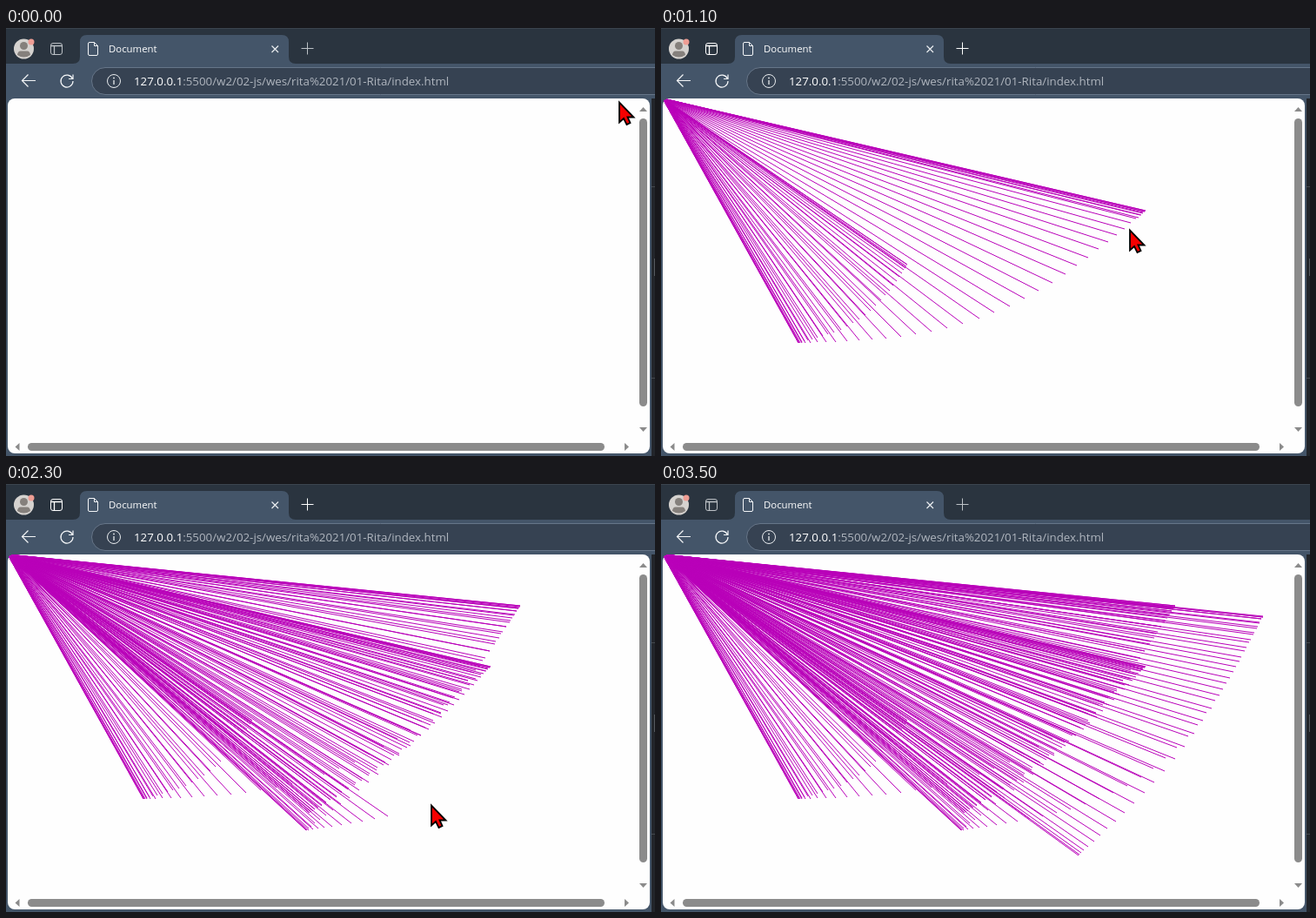
These frames come from a looping animation (746x492 px, 3.6 s). An HTML page with a canvas:

```html
<!DOCTYPE html>
<html lang="en">
<head>
<meta charset="utf-8">
<title>Mouse lines</title>
<style>
html, body { margin: 0; width: 746px; height: 492px; overflow: hidden; background: #445569; }
canvas { display: block; }
</style>
</head>
<body>
<canvas id="stage" width="746" height="492"></canvas>
<script>
const g = document.getElementById('stage').getContext('2d');
const LOOP = 3600, FRAME = 100, EVENT = 10, LAG = 28;
const PRESS = 380, RELEASE = 2830, LEAVE = 3200, BLUR = 3500;

// Turning points of the pointer; bulge bends the swing that leads there
const turns = [
  { t: 0, x: 704, y: 84 },
  { t: PRESS, x: 283, y: 272, bulge: 0 },
  { t: 670, x: 158, y: 362, bulge: 19 },
  { t: 1020, x: 557, y: 210, bulge: 48 },
  { t: 1400, x: 349, y: 378, bulge: 12 },
  { t: 1830, x: 591, y: 140, bulge: 24 },
  { t: 2160, x: 345, y: 398, bulge: 20 },
  { t: 2530, x: 692, y: 152, bulge: 70 },
  { t: RELEASE, x: 480, y: 427, bulge: 20 },
  { t: 2950, x: 480, y: 427, bulge: 0 },
  { t: 3120, x: 727, y: 262, bulge: 0 }
];

function pointer(t) {
  const i = turns.findIndex(p => p.t > t);
  if (i < 0) return turns[turns.length - 1];
  const a = turns[i - 1], b = turns[i];
  const p = (1 - Math.cos(Math.PI * (t - a.t) / (b.t - a.t))) / 2;
  const dx = b.x - a.x, dy = b.y - a.y;
  const bend = b.bulge * Math.sin(Math.PI * p) / (Math.hypot(dx, dy) || 1);
  // Every swing bends towards the lower right
  return {
    x: Math.round(a.x + dx * p + Math.abs(dy) * bend),
    y: Math.round(a.y + dy * p + Math.abs(dx) * bend)
  };
}

function paint(fill, stroke) {
  if (fill) { g.fillStyle = fill; g.fill(); }
  if (stroke) { g.strokeStyle = stroke; g.stroke(); }
}

function box(x, y, w, h, r, fill, stroke) {
  g.beginPath();
  g.roundRect(x, y, w, h, r);
  paint(fill, stroke);
}

function disc(x, y, r, fill, stroke) {
  g.beginPath();
  g.arc(x, y, r, 0, 7);
  paint(fill, stroke);
}

function shape(d, fill, stroke, width = 1) {
  const p = new Path2D(d);
  g.lineWidth = width;
  if (fill) { g.fillStyle = fill; g.fill(p); }
  if (stroke) { g.strokeStyle = stroke; g.stroke(p); }
  g.lineWidth = 1;
}

function text(s, x, y, size, color) {
  g.font = size + 'px "Open Sans", "Noto Sans", sans-serif';
  g.fillStyle = color;
  g.fillText(s, x, y);
  return x + g.measureText(s).width;
}

function tabStrip(active) {
  const ink = active ? '#ffffff' : '#bcc1c6';
  box(0, 0, 746, 41, 0, '#2a343f');
  box(0, 0, 746, 1, 0, '#3b444e');
  shape('M77 41Q85 41 85 33V16Q85 8 93 8H317Q325 8 325 16V33Q325 41 333 41Z', '#445569');

  disc(20.5, 24, 11.5, '#d5d2cf');
  disc(20.5, 20.5, 4.5, '#85807c');
  shape('M13 31Q13.5 26.5 16.5 26.5H24.5Q27.5 26.5 28 31Q20.5 36 13 31Z', '#85807c');
  disc(29, 16, 3.5, '#ee9d94');

  box(51.5, 17.5, 13, 13, 2.5, null, ink);
  shape('M52 20.5H64M55.5 21V30', null, ink, 1.3);

  shape('M96 16.5H101.5L105.5 20.5V30Q105.5 31.5 104 31.5H96Q94.5 31.5 94.5 30V18Q94.5 16.5 96 16.5ZM101.5 16.5V20.5H105.5', null, '#f3f5f7');
  text('Document', 118, 28, 11.4, '#ffffff');
  shape('M305.5 20.5L313 28M313 20.5L305.5 28', null, '#e9ecef', 1.2);
  shape('M339.5 23.5H353.5M346.5 16.5V30.5', null, ink);
}

function toolbar() {
  box(0, 41, 746, 451, 0, '#445569');
  shape('M34 60.5H18.5M25.5 53.5L18.5 60.5L25.5 67.5', null, '#f4f6f8', 1.2);
  shape('M76.3 58A7 7 0 1 0 77 61M77 53.5V58.5H72', null, '#f4f6f8', 1.2);
  box(98.5, 45.5, 680, 31, 15.5, '#364252', '#667588');
  disc(124, 61, 7.5, null, '#e9ecef');
  shape('M124 60V65', null, '#e9ecef', 1.3);
  disc(124, 57.5, 0.9, '#e9ecef');
  const x = text('127.0.0.1', 147, 66, 13.3, '#ffffff');
  text(':5500/w2/02-js/wes/rita%2021/01-Rita/index.html', x, 66, 13.3, '#b0b6bf');
}

function page() {
  box(742, 81, 4, 411, 0, '#22252a');
  for (const y of [182, 402]) box(742, y, 4, 1, 0, '#44484d');
  box(745, 265, 1, 20, 0, '#55595e');
  box(2, 81, 738, 408, 8, '#fefefe');
}

function scrollbars() {
  const gray = '#8b8b8b';
  box(728, 104, 9, 331, 4.5, gray);
  box(25, 477, 663, 9, 4.5, gray);
  shape('M728 96L732.5 91L737 96ZM728 459L732.5 464L737 459ZM15.5 477L10.5 481.5L15.5 486ZM711 477L716 481.5L711 486Z', gray);
}

function lines(t) {
  g.save();
  g.beginPath();
  g.roundRect(2, 81, 738, 408, 8);
  g.clip();
  g.strokeStyle = '#b900b9';
  const end = Math.min(t - LAG, RELEASE);
  for (let s = PRESS; s <= end; s += EVENT) {
    const { x, y } = pointer(s);
    g.beginPath();
    g.moveTo(2, 81);
    g.lineTo(x, y);
    g.stroke();
  }
  g.restore();
}

function cursor(t) {
  const { x, y } = pointer(t);
  g.save();
  g.translate(x, y);
  shape('M1 1.5V24.5L6 20L9.5 27L13.5 25L10.5 18.5H17.5Z', '#f60000', '#000000', 1.8);
  g.restore();
}

function draw(t) {
  toolbar();
  tabStrip(t >= PRESS && t < BLUR);
  page();
  lines(t);
  scrollbars();
  if (t < LEAVE) cursor(t);
}

const start = performance.now();
function tick() {
  const t = (performance.now() - start) % LOOP;
  draw(Math.floor(t / FRAME) * FRAME);
  requestAnimationFrame(tick);
}
tick();
</script>
</body>
</html>
```
